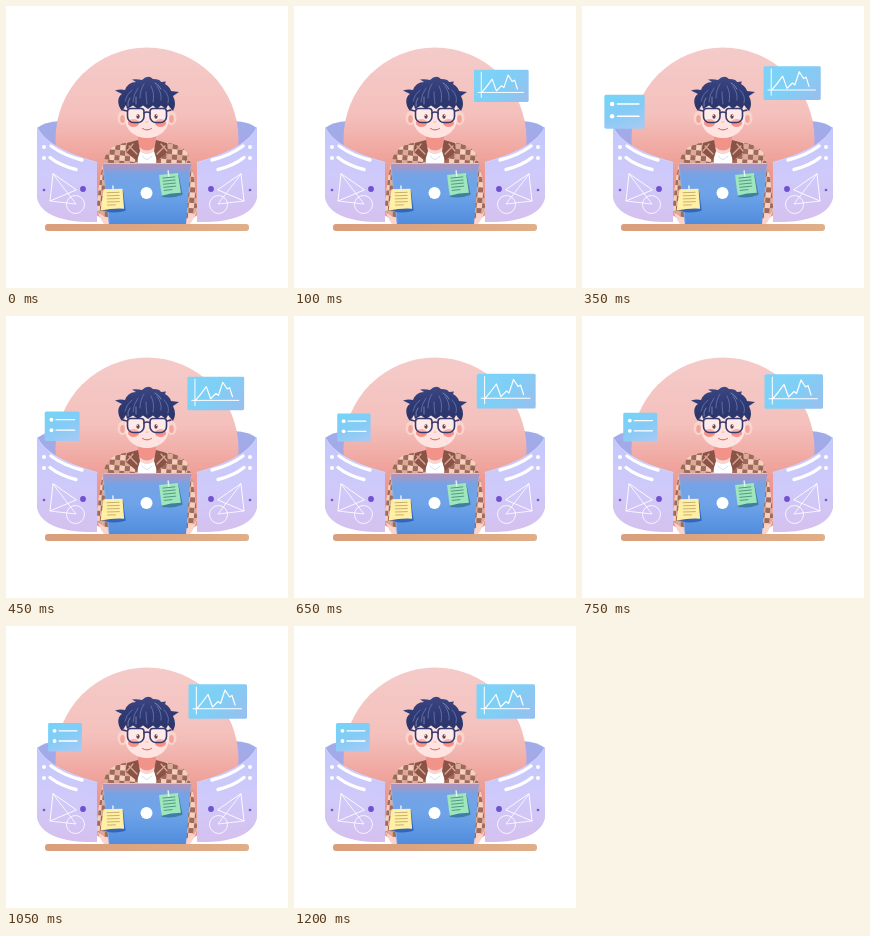
An HTML page with a canvas that plays this animation: 282x282 px, repeating every 1250 ms.

```html
<!DOCTYPE html>
<html lang="en">
<head>
<meta charset="utf-8">
<title>Working at the desk</title>
<style>
html, body { margin: 0; width: 100%; height: 100%; overflow: hidden; background: #fff; }
canvas { display: block; width: 282px; height: 282px; }
</style>
</head>
<body>
<canvas id="stage"></canvas>
<script>
const SIZE = 282, LOOP = 1250, STEP = 50, TAU = Math.PI * 2, AXIS = 141;
const canvas = document.getElementById('stage');
const ctx = canvas.getContext('2d');
const dpr = window.devicePixelRatio || 1;
canvas.width = canvas.height = SIZE * dpr;

function gradient(x0, y0, x1, y1, ...colors) {
  const g = ctx.createLinearGradient(x0, y0, x1, y1);
  colors.forEach((c, i) => g.addColorStop(i / (colors.length - 1), c));
  return g;
}
function fill(d, color) {
  ctx.fillStyle = color;
  ctx.fill(new Path2D(d));
}
function line(d, color, width) {
  ctx.strokeStyle = color;
  ctx.lineWidth = width;
  ctx.stroke(new Path2D(d));
}
function oval(x, y, rx, ry, color) {
  ctx.fillStyle = color;
  ctx.beginPath();
  ctx.ellipse(x, y, rx, ry, 0, 0, TAU);
  ctx.fill();
}
function box(x, y, w, h, r, color) {
  ctx.fillStyle = color;
  ctx.beginPath();
  ctx.roundRect(x, y, w, h, r);
  ctx.fill();
}
function group(draw) {
  ctx.save();
  draw();
  ctx.restore();
}
// Draws once as is and once mirrored around the vertical axis.
function both(draw) {
  group(draw);
  group(() => {
    ctx.translate(AXIS * 2, 0);
    ctx.scale(-1, 1);
    draw();
  });
}

// Fast linear growth, then a damped bounce around 1.
function spring(ms) {
  const rise = 107;
  if (ms <= 0) return 0;
  if (ms < rise) return ms / rise;
  const s = (ms - rise) / 1000;
  return 1 + 0.397 * Math.sin(TAU * 2.3 * s) * Math.exp(-7.5 * s);
}

function backdrop() {
  both(() => fill('M31 122 Q38 116 54 115 L62 155 L34 140Z',
    gradient(32, 116, 52, 150, '#9eaeea', '#aaa4e4')));
  group(() => {
    ctx.beginPath();
    ctx.rect(0, 0, SIZE, 218);
    ctx.clip();
    oval(141, 133, 91.5, 91.5, gradient(0, 42, 0, 172, '#f4cbc9', '#f4c1bd', '#ed968d'));
  });
}

function panel() {
  fill('M31 121 C39 137 62 148 91 156 V216 C66 217 35 212 31 192Z',
    gradient(66, 128, 58, 216, '#c3c8fc', '#cfcafa', '#d5c0ee'));
  line('M31.5 122 C39 137.5 62 148.5 91 156.5', '#cdd3fd', 1);
  const white = '#fff';
  line('M45 140 Q58 149.5 76 154', white, 3.4);
  line('M44 151.5 Q54 159.5 70 163.5', white, 3.4);
  oval(38, 141, 2, 2, white);
  oval(38, 152, 2, 2, white);
  line('M47 168 L44 195 L70 184Z', white, 0.9);
  line('M47 168 L70 198 L44 195', white, 0.8);
  ctx.beginPath();
  ctx.arc(69.5, 198.5, 9, 0, TAU);
  ctx.stroke();
  oval(77, 183, 2.9, 2.9, '#6e50d2');
  oval(38, 184, 1.3, 1.3, '#7557d0');
}

function growing(scale, draw) {
  if (!scale) return;
  group(() => {
    ctx.translate(144, 140);
    ctx.scale(scale, scale);
    ctx.translate(-144, -140);
    draw();
  });
}
function chartCard() {
  box(182.5, 58.3, 58.5, 34.5, 1.5, gradient(190, 56, 234, 95, '#7cd3f7', '#7fcef6', '#97c0ee'));
  line('M190.3 61 V88 M187 82.7 H235.5', '#fff', 1);
  line('M191 82.5 Q196 77 202 68.5 L206.5 81 L212 75.5 L214.5 77.5 L219 64 L223.5 71 L226 69.5 L229 79',
    '#fff', 1.2);
}
function listCard() {
  box(42, 97, 33.8, 28.5, 1.5, gradient(53, 96, 64, 126, '#76d3f8', '#84cbf6', '#a2caf4'));
  for (const y of [104.8, 115]) {
    oval(48.5, y, 1.9, 1.9, '#fff');
    line(`M53 ${y} H71`, '#fff', 1.3);
  }
}

function shirt() {
  const body = 'M124 136 Q106 138 100 148 Q94 164 91 200 Q91 207 96 209 L103 214 H179 L186 209' +
    ' Q191 207 191 200 Q188 164 182 148 Q176 138 158 136Z';
  both(() => fill('M91 202 Q92 210 98 218 H110 V202Z', '#f9d3cc'));
  group(() => {
    ctx.clip(new Path2D(body));
    ctx.fillStyle = '#f6d3c1';
    ctx.fillRect(88, 132, 106, 88);
    ctx.translate(141, 136);
    ctx.rotate(0.08);
    const cell = 5.2;
    for (let row = -2; row < 18; row++) {
      for (let col = -12; col < 12; col++) {
        ctx.fillStyle = (row + col) % 2 ? '#a0695a' : row % 2 ? '#f4d0be' : '#dcab98';
        ctx.fillRect(col * cell, row * cell, cell, cell);
      }
    }
  });
  both(() => line('M103 152 Q101 158 100 190', '#8d5849', 0.8));
  fill('M130 137 H152 L150 158 H132Z', '#fff');
  fill('M132 126 H150 V143 Q141 152 132 143Z', '#f2938a');
  fill('M133 141 Q141 148 149 141 V144 Q141 152 133 144Z', '#fbd6cf');
  both(() => {
    fill('M132 134 L121 137 L120 146 L131 155 L134 145Z', '#8a5347');
    line('M123 140 L131 148 M121 145 L127 138', '#d9a794', 1.3);
  });
  line('M136 150 L141 154 L146 150', '#cdd5ef', 0.8);
}

function head() {
  const hair = gradient(0, 71, 0, 105, '#3c4782', '#2f3a74', '#2b3569');
  const frame = '#36396b';
  both(() => {
    oval(116.5, 112, 5, 7, '#fbd3cd');
    oval(116.5, 113, 2.3, 4, '#f2a49c');
  });
  fill('M119 96 H163 V112 C163 125 152 132 141 132 C130 132 119 125 119 112Z', '#fee3e0');
  both(() => oval(127.5, 117, 5.5, 4, 'rgba(245,105,90,.68)'));
  fill('M116 105 C111 99 111 91 116 88 L109 84.5 Q114 83 119 84 Q122 76 130 76 L126 73.5 Q132 73 136 74' +
    ' Q142 68 147 73 Q154 73 155 76 L160 75.5 L159 78 Q164 81 165 85 L173 86 L167 90 Q171 98 167 105' +
    ' L162 99 L160 103 L155 99.5 L151 103 L147 99.5 L142 103 L137 99.5 L132 103 L127 99.5 L121 103 L120 99Z', hair);
  line('M126 84 Q120 89 119 95 M132 82 Q127 89 127 96 M138 78 Q134 84 134 92' +
    ' M145 80 Q149 88 147 96 M151 80 Q156 87 155 94 M158 84 Q164 90 162 97 M140 86 Q140 92 141 98', '#6878b4', 0.8);
  line('M124 92 Q121 96 122 100 M149 77 Q153 79 155 83 M130 91 L130 98', '#a8b2d7', 0.6);
  both(() => {
    ctx.fillStyle = 'rgba(255,255,255,.3)';
    ctx.strokeStyle = frame;
    ctx.lineWidth = 1.6;
    ctx.beginPath();
    ctx.roundRect(121.5, 102.5, 16.5, 14, [3, 3, 6, 6]);
    ctx.fill();
    ctx.stroke();
    line('M121 105 L117 104', frame, 1.5);
    oval(132, 110.5, 1.6, 2.2, '#70434a');
    oval(131.5, 109.6, 0.5, 0.5, '#fff');
  });
  line('M138 107 Q141 105 144 107', frame, 1.5);
  line('M140 116 Q141 117 142 116', '#f0a59a', 0.8);
  line('M136.5 122.5 Q141 125.5 145.5 122.5', '#d0625c', 1);
}

function laptop() {
  const lid = 'M97 157 H185 L180 218 H103Z';
  fill(lid, gradient(0, 157, 0, 218, '#7aa3e6', '#6ea3e8', '#518ddd'));
  fill(lid, gradient(0, 158, 0, 168, 'rgba(186,145,180,.9)', 'rgba(186,145,180,0)'));
  line('M97.5 157.5 H184.5', '#b4cdf1', 1.2);
  line('M97 159.5 L103 217', '#91b3e8', 0.8);
  oval(140.5, 187, 6, 6, '#fff');
}

function note(x, y, angle, curl, paper, shade, ink) {
  group(() => {
    ctx.translate(x, y);
    ctx.rotate(angle);
    fill('M-8 2 H10 L12 22 Q2 25 -9 22Z', shade);
    fill(`M-9.5 0 H9.5 L10.5 20 Q0 19 ${-9 - curl} 21Z`, paper);
    for (let i = 0; i < 5; i++) line(`M-6 ${3.5 + i * 3.1} H${i === 4 ? 2 : 6}`, ink, 0.8);
    line('M0 -3 V2', '#e8edf8', 1.5);
  });
}

function render(t) {
  ctx.setTransform(dpr, 0, 0, dpr, 0, 0);
  ctx.fillStyle = '#fff';
  ctx.fillRect(0, 0, SIZE, SIZE);
  ctx.lineCap = ctx.lineJoin = 'round';
  backdrop();
  both(panel);
  growing(spring(t), chartCard);
  growing(spring(t - 150), listCard);
  shirt();
  head();
  laptop();
  note(107, 183, -0.03, 4, '#fff0a6', '#3266bd', '#c0a05f');
  note(162.5, 168, -0.1, 0, '#a0e6bd', '#3f7fa5', '#3e8b78');
  box(39, 218, 204, 7, 3, gradient(39, 0, 243, 0, '#d99e7b', '#dea581', '#dfaf88'));
}

function tick(now) {
  render(Math.floor((now % LOOP) / STEP) * STEP);
  requestAnimationFrame(tick);
}
render(0);
requestAnimationFrame(tick);
</script>
</body>
</html>
```
